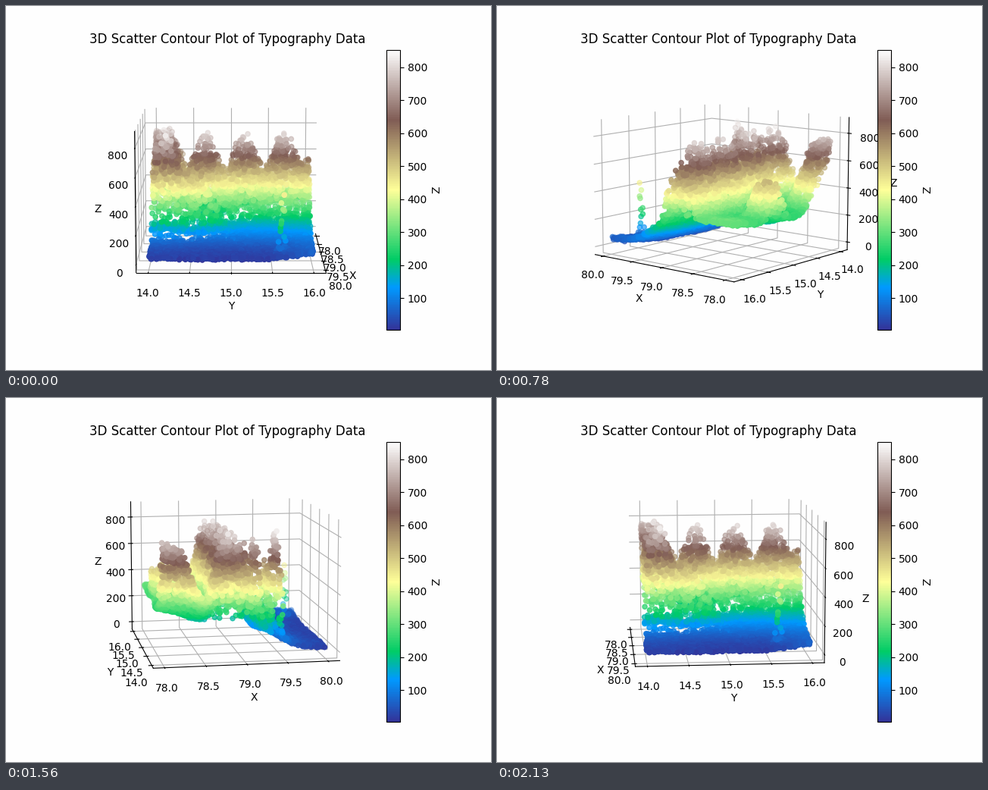
A matplotlib script for the animation above (2160 ms loop, 640 by 480 pixels).

```python
import numpy as np
import matplotlib.pyplot as plt
from matplotlib.animation import FuncAnimation

FRAMES = 72
X_MIN, X_MAX = 78.01, 80
Y_MIN, Y_MAX = 14, 16
Z_MIN, Z_MAX = 4, 853
rng = np.random.default_rng(7)


def bump(d, width):
    return np.exp(-(d / width) ** 2)


def mesa(d, width):
    """Flat-topped bump with steep sides."""
    return np.exp(-(d / width) ** 4)


def ground(u, v):
    """Western plateau falling to the eastern plain, cut by a river valley."""
    plateau = 15 + 250 / (1 + np.exp((u - 1.3) / 0.17))
    valley = 110 * bump(u - 0.75, 0.5) * bump(v - 0.65, 0.4)
    corner = 340 * np.exp(-u / 0.45) * bump(v, 0.36)
    north = 38 * bump(v - 2, 0.35)
    return plateau - valley + corner + north


def terrain(x, y):
    u, v = x - 78, y - 14
    low = ground(u, v)
    crest = 690 + 120 * np.cos(4 * np.pi * (v - 0.17)) + 40 * (v - 1) ** 2

    # Each range of hills: how high it may reach, and where it stands
    ranges = [
        (crest, mesa(u - 0.85, 0.24)),
        (crest, mesa(u - 1.15 + 0.08 * v, 0.07) * mesa(v, 1.3)),
        (crest + 30, mesa(u - 1.42 + 0.12 * v, 0.06) * mesa(v, 0.8)),
        (780, mesa(u, 0.36) * mesa(v, 0.42)),
        (530, mesa(u - 0.15, 0.2) * mesa(v - 1.17, 0.2)),
        (540, bump(u - 1.83, 0.04) * bump(v - 1.63, 0.04)),
    ]
    rise = np.max([(top - low) * shape for top, shape in ranges], axis=0)
    z = low + np.maximum(rise, 0) * rng.beta(2, 1.3, x.size)
    return np.clip(z + rng.normal(0, 5, x.size), Z_MIN, Z_MAX)


def padded(lo, hi):
    pad = (hi - lo) * 0.05
    edge = (hi - lo + 2 * pad) / 48
    return lo - pad - edge, hi + pad + edge


n = 8000
x = rng.uniform(X_MIN, X_MAX, n)
y = rng.uniform(Y_MIN, Y_MAX, n)
z = terrain(x, y)

fig = plt.figure(figsize=(6.4, 4.8), dpi=100, facecolor="#fefefe")
ax = fig.add_subplot(111, projection="3d", facecolor="none")
points = ax.scatter(x, y, z, c=z, cmap="terrain", vmin=Z_MIN, vmax=Z_MAX)
fig.colorbar(points, ax=ax, label="Z")

ax.set(xlabel="X", ylabel="Y", zlabel="Z",
       title="3D Scatter Contour Plot of Typography Data")
ax.set_xlim(padded(X_MIN, X_MAX))
ax.set_ylim(padded(Y_MIN, Y_MAX))
ax.set_zlim(padded(Z_MIN, Z_MAX))

for axis in (ax.xaxis, ax.yaxis, ax.zaxis):
    axis.set_pane_color((1, 1, 1, 0))
ax.yaxis.pane.set_edgecolor("0.92")


def update(i):
    ax.view_init(elev=10, azim=360 * i / FRAMES)
    return points,


ani = FuncAnimation(fig, update, frames=FRAMES, interval=30, repeat=True)
plt.show()
```
